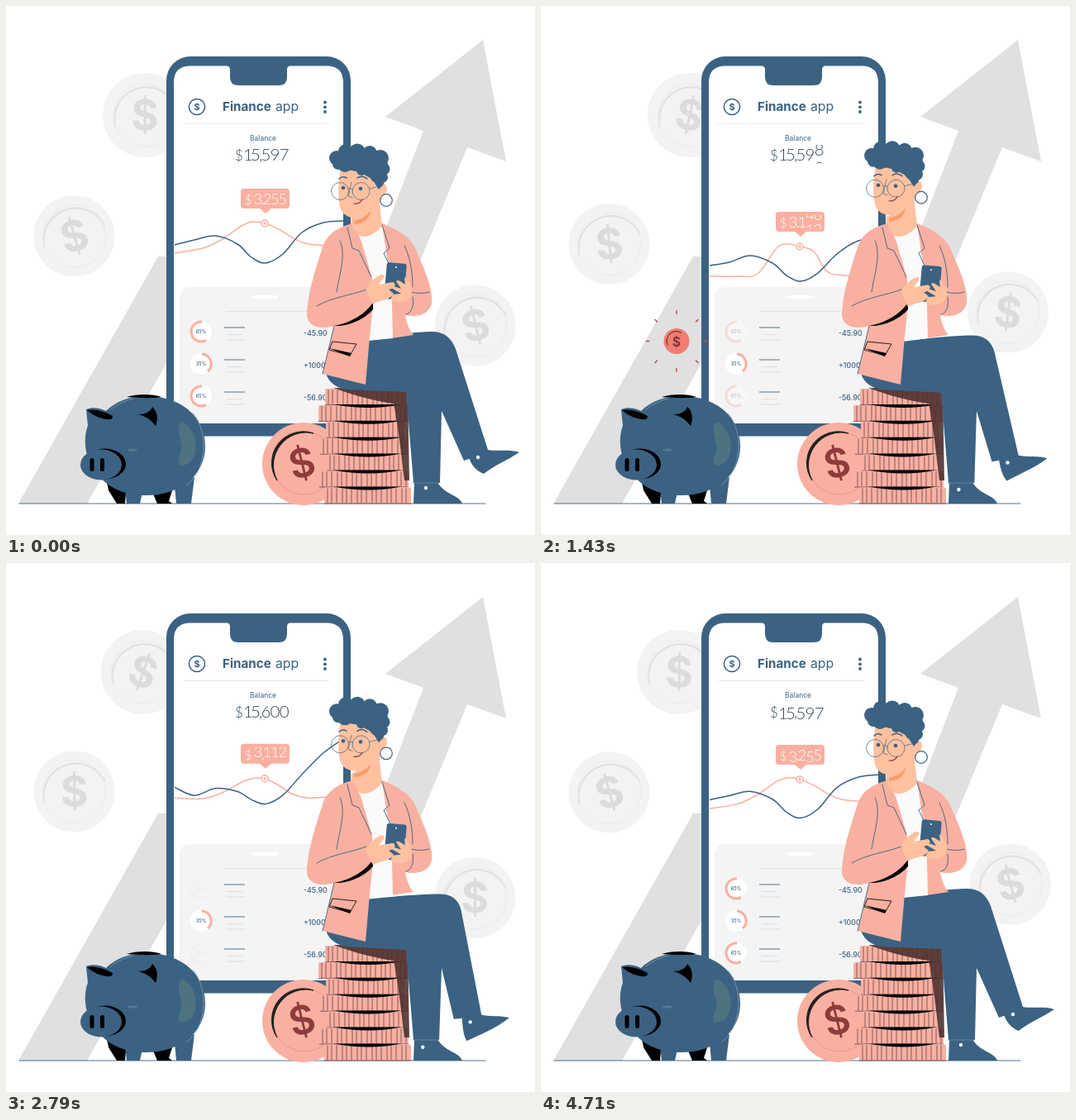
Write an HTML page that moves like this. It is 640 px wide and 640 px high and loops after 4.78 s.

```html
<!DOCTYPE html>
<html lang="en">
<head>
<meta charset="utf-8">
<title>Finance app</title>
<style>
html, body { margin: 0; width: 100%; height: 100%; overflow: hidden; background: #fff; }
svg { display: block; width: 100vw; height: 100vh; }
text { font-family: Inter, Roboto, sans-serif; fill: #3b6283; }
.navy { fill: #3b6283; }
.pink { fill: #f9b0a0; }
.skin { fill: #ffc19f; }
.grey { fill: #e0e0e0; }
.thin { fill: none; stroke: #3b6283; stroke-width: .9; stroke-linecap: round; stroke-linejoin: round; }
.curve { fill: none; stroke-width: 1.5; }
.mid { text-anchor: middle; }
.roll text { font-family: Lato, sans-serif; font-weight: 300; text-anchor: middle; }
#sum text { fill: #34495c; }
#tip text { fill: #fff; }
</style>
</head>
<body>
<svg viewBox="0 0 640 640">
  <defs>
    <clipPath id="screenClip"><rect x="203" y="75" width="205" height="430"/></clipPath>
    <clipPath id="sumClip"><rect x="270" y="168" width="80" height="22.5"/></clipPath>
    <clipPath id="tipClip"><rect x="284" y="4" width="58" height="17"/></clipPath>
    <clipPath id="slotClip"><rect x="120" y="360" width="90" height="114"/></clipPath>
  </defs>

  <g class="grey">
    <path d="M577 41L605 188L558 171L490 335H434L505 151L459 134Z"/>
    <path d="M15 602L184 303H200V422L98 602Z"/>
  </g>
  <g id="coins"></g>
  <path class="thin" d="M16 602H580"/>

  <!-- phone -->
  <rect class="navy" x="194" y="61" width="223" height="459.500" rx="29"/>
  <path fill="#fff" d="M223 72.500H267Q271 72.500 271 77V86Q271 96 281 96H330Q340 96 340 86V77Q340 72.500 344 72.500H388Q408 72.500 408 93V505H203V93Q203 72.500 223 72.500Z"/>
  <circle class="thin" cx="231" cy="122" r="9.6" style="stroke-width:1.5"/>
  <text class="mid" x="231" y="126" font-size="11" font-weight="700">$</text>
  <text x="262" y="127" font-size="15.2" font-weight="700">Finance</text>
  <text x="326" y="127" font-size="15.8">app</text>
  <g class="navy"><circle cx="386" cy="116.500" r="1.900"/><circle cx="386" cy="122.300" r="1.900"/><circle cx="386" cy="128" r="1.900"/></g>
  <path d="M215 142.500H391" stroke="#e6e6e6"/>
  <text class="mid" x="311" y="163" font-size="8.500">Balance</text>
  <g class="roll" id="sum" clip-path="url(#sumClip)" font-size="20.500"></g>

  <path fill="#f4f4f4" d="M210 505V354Q210 340 224 340H390Q404 340 404 354V505Z"/>
  <path d="M300 352H327" stroke="#fff" stroke-width="4" stroke-linecap="round"/>
  <path d="M266 369.500H371" stroke="#e2e2e2"/>
  <g id="rows"></g>

  <g clip-path="url(#screenClip)">
    <path id="pinkLine" class="curve" stroke="#f9b0a0"/>
    <path id="blueLine" class="curve" stroke="#3b6283"/>
  </g>
  <g id="tip">
    <path class="pink" d="M288 0H339Q343 0 343 4V20Q343 24 339 24H321L314 30L307 24H288Q284 24 284 20V4Q284 0 288 0Z"/>
    <g class="roll" id="tipNum" clip-path="url(#tipClip)" font-size="18"></g>
    <circle cx="313" cy="42" r="4" fill="#fff" stroke="#f9b0a0" stroke-width="1.500"/>
    <circle class="pink" cx="313" cy="42" r="1.800"/>
  </g>

  <!-- piggy bank -->
  <path d="M123 580L143 602H134L124 586ZM180 585L201 602H183L178 590ZM180 580H203L196 602H183ZM122 578H146L144 602H134Z"/>
  <path class="navy" d="M143 575H168L162 602H146ZM203 570H228L224 602H206Z"/>
  <path class="navy" d="M97 488C104 485 114 486 121 490C133 478 150 472 170 472C212 472 241 497 241 533C241 568 210 592 170 592C142 592 124 582 114 570C94 552 93 522 99 508Z"/>
  <path d="M98 489C108 487 120 491 129 496C129 500 126 501 122 500C112 499 104 494 98 489ZM177 485C184 491 184 501 181 508C175 500 168 496 160 494C168 494 175 491 177 485Z"/>
  <path d="M213 503C224 508 232 522 229 540C226 553 216 558 210 555C205 550 214 542 212 530C209 520 206 508 213 503Z" fill="#4e7280"/>
  <path class="thin" d="M226 492C246 516 243 562 218 580M127 488C136 481 145 477 154 475" style="stroke:#8ba5b5;stroke-width:.7"/>
  <ellipse cx="153" cy="537" rx="6" ry="1.800" fill="#56788a"/>
  <path d="M146 473C158 469 178 469 188 473C176 475 160 474 146 473Z"/>
  <ellipse cx="120" cy="554" rx="25" ry="18.500"/>
  <ellipse class="navy" cx="115" cy="555" rx="25" ry="18.500"/>
  <rect x="101.500" y="547" width="5" height="16" rx="2.500"/><rect x="114" y="547" width="5" height="16" rx="2.500"/>

  <!-- coin falling into the slot -->
  <path id="rays" fill="none" stroke-width="1.500" stroke-linecap="round"/>
  <g clip-path="url(#slotClip)">
    <g id="drop">
      <circle id="dropFace" r="15.500"/>
      <path d="M-10.500 5A11.500 11.500 0 0 1 6 -10" fill="none" stroke="#6b3434" stroke-width="1.200"/>
      <text class="mid" y="6" font-size="16" font-weight="600" style="fill:#7c3434">$</text>
    </g>
  </g>

  <!-- coin and stack -->
  <circle class="pink" cx="360" cy="554" r="50"/>
  <circle cx="361" cy="553" r="38" fill="#f9b0a0" stroke="#e59a8c"/>
  <path d="M328 574A38 38 0 0 1 372 517A39.500 39.500 0 0 0 328 574Z" stroke="#222" stroke-width="1.300" fill="#222"/>
  <text class="mid" font-size="48" font-weight="600" transform="translate(358 553) rotate(-14)" y="17" style="fill:#8f3b3b">$</text>
  <g id="stack"></g>
  <path d="M396 462H486L488 574H482C478 540 474 505 469 481C446 478 420 471 396 462Z" fill="#4a2e2c" opacity=".88"/>

  <!-- legs -->
  <path class="navy" d="M494 576L493 602H552C549 592 530 591 522 576Z"/>
  <path id="shoe" class="navy"/>
  <path id="legs" class="navy"/>
  <path d="M492 577H524" stroke="#6f8ca3" stroke-width=".8"/>
  <circle id="dotA" r="2.200" fill="#fff"/><circle id="dotB" r="2.200" fill="#fff"/>

  <!-- torso -->
  <path class="pink" d="M453 262C475 271 492 280 498 300C508 322 517 345 515 360C512 374 495 377 483 374C485 386 489 394 493 398L466 402Z"/>
  <path fill="#fafafa" d="M427 280L455 266L466 320L468 402L438 405L440 320Z"/>
  <path class="skin" d="M418 255L417 268C424 282 440 284 455 266L452 240Z"/>
  <path class="pink" d="M420 263C402 267 388 276 383 292C373 322 364 352 364 374C365 388 380 392 397 387L383 445L435 458L440 400L444 362L443 330L430 285Z"/>
  <path class="pink" d="M455 263L470 292L462 300L466 322L461 305Z"/>
  <path d="M397 387C418 383 434 373 444 359V367C434 379 414 388 397 387Z"/>
  <path class="thin" d="M413 268L419 293L427 296L442 328M455 265L464 293L457 299L466 318M404 284C412 300 403 326 400 346M376 363C395 352 418 350 436 343M397 387L383 445M482 290C490 306 492 326 492 340M484 373C490 372 494 364 492 352M489 346C498 348 506 348 512 346"/>
  <path d="M395 406L424 409L416 423L391 416Z" fill="#f9b0a0" stroke="#222"/>
  <path d="M391 414L418 420L416 424Z"/>

  <g id="hands">
    <rect class="navy" x="459" y="311" width="24" height="44" rx="3" transform="rotate(5 471 333)"/>
    <circle cx="472" cy="316" r="1" fill="#fff"/>
    <path class="skin" d="M435 342C443 331 451 324 456 325C461 327 453 333 451 337L468 334C474 337 469 342 463 343L469 348C464 357 452 355 444 361Z"/>
    <path class="skin" d="M482 328C489 333 493 343 490 351C486 360 472 360 465 355L468 349L478 348L466 341C465 337 474 341 478 342L472 333C474 330 480 335 483 337Z"/>
  </g>

  <!-- head -->
  <g id="head">
    <path class="skin" d="M404 200C402 218 401 236 405 246C408 253 416 257 424 256L419 260L420 272L450 262L453 230C462 229 464 217 456 214L455 195Z"/>
    <path d="M421 260C430 258 436 254 441 248C440 257 434 263 421 264Z" fill="#f99d6a"/>
    <g id="hair" class="navy"><path d="M404 190L408 200C420 196 438 203 446 214L451 222L457 215L462 190L440 174L410 176Z"/></g>
    <path class="thin" d="M418 213L414 230L419 232M393.500 224A10.500 10.500 0 1 1 414.500 224A10.500 10.500 0 1 1 393.500 224M419 224A10.500 10.500 0 1 1 440 224A10.500 10.500 0 1 1 419 224M440 221L456 217M414.500 221Q417 219 419 222" style="stroke-width:.7"/>
    <path class="thin" d="M403 209Q407 205 412 208M425 208Q431 204 437 209" style="stroke-width:1.500"/>
    <circle class="navy" cx="408" cy="220" r="2.300"/><circle class="navy" cx="429" cy="221" r="2.300"/>
    <path d="M421 239Q428 240 431 234" fill="none" stroke="#8f3b3b" stroke-width="1.200" stroke-linecap="round"/>
    <circle class="thin" cx="460" cy="235" r="7.300" style="stroke-width:1.200"/>
  </g>
</svg>
<script>
const LOOP = 4780, STEP = 71.34;
const $ = id => document.getElementById(id);
const add = (parent, tag, attrs, text = '') => {
  const el = document.createElementNS('http://www.w3.org/2000/svg', tag);
  for (const k in attrs) el.setAttribute(k, attrs[k]);
  el.textContent = text;
  return parent.appendChild(el);
};
const wave = (t, peak = 0) => Math.cos(2 * Math.PI * (t - peak) / LOOP);
const clamp = x => Math.min(1, Math.max(0, x));
const ramp = (t, a, b) => clamp((t - a) / (b - a));
const smooth = x => x * x * (3 - 2 * x);
const mix = (a, b, k) => a + (b - a) * k;
const mixRgb = (a, b, k) => `rgb(${a.map((v, i) => Math.round(mix(v, b[i], k)))})`;
const mixPath = (a, b, k) => {
  const nums = b.match(/\d+/g);
  let i = 0;
  return a.replace(/\d+/g, n => mix(+n, +nums[i++], k).toFixed(2));
};

// Floating coins
const coins = [51, 49, 49].map(r => {
  const g = add($('coins'), 'g', {});
  add(g, 'circle', { r, fill: '#f3f3f3' });
  add(g, 'path', { d: 'M-36 14A39 39 0 0 1 37 -12', fill: 'none', stroke: '#e2e2e2', 'stroke-width': 2.5 });
  add(g, 'circle', { r: 38, fill: 'none', stroke: '#ebebeb' });
  const sign = add(g, 'text', { class: 'mid', y: 18, 'font-size': 51, 'font-weight': 700, style: 'fill:#dcdcdc' }, '$');
  return { g, sign };
});
const place = ({ g, sign }, x, y, turn) => {
  g.setAttribute('transform', `translate(${x} ${y})`);
  sign.setAttribute('transform', `rotate(${turn})`);
};

// List rows
const fading = [];
[['65%', '-45.90'], ['35%', '+1000'], ['65%', '-56.90']].forEach(([share, amount], i) => {
  const y = 394 + i * 39, ring = add($('rows'), 'g', { transform: `translate(236 ${y})` });
  add(ring, 'circle', { r: 13, fill: '#fff' });
  add(ring, 'path', {
    d: i === 1 ? 'M1 -12A12 12 0 0 1 8 9' : 'M1 -12A12 12 0 1 0 6 10.4',
    fill: 'none', stroke: '#f9b0a0', 'stroke-width': 3
  });
  add(ring, 'text', { class: 'mid', y: 2, 'font-size': 5.6, 'font-weight': 500 }, share);
  if (i !== 1) fading.push(ring);
  add($('rows'), 'path', { d: `M264 ${y - 5}H289`, stroke: '#3b6283', 'stroke-width': .9 });
  add($('rows'), 'path', { d: `M267 ${y + 3.5}H286M266 ${y + 10}H290`, stroke: '#dcdcdc', 'stroke-width': .9 });
  add($('rows'), 'text', { x: 360, y: y + 5, 'font-size': 8.8, 'font-weight': 500 }, amount);
});

// Coin stack
[[386, 484], [378, 487], [387, 482], [380, 486], [388, 481], [379, 487], [385, 490]].forEach(([l, r], i) => {
  const y = 463 + i * 19.9;
  add($('stack'), 'rect', { class: 'pink', x: l, y, width: r - l, height: 19.5, rx: 2 });
  let d = `M${l} ${y + 19.5}H${r}`;
  for (let x = l + 4, j = 0; x < r - 2; x += 5 + j++ % 3) d += `M${x} ${y + 1}v18`;
  add($('stack'), 'path', { d, stroke: '#75505c', 'stroke-width': .9 });
  if (i) add($('stack'), 'path', { d: `M396 ${y - 1}H478Q440 ${y + 7} 396 ${y - 1}Z` });
});

// Curls: x, y, radius
[[400, 184, 9], [411, 176, 9], [425, 176, 9.5], [440, 178, 9], [453, 184, 10], [457, 197, 7.5],
 [455, 207, 7], [442, 194, 13], [424, 188, 12], [410, 192, 9], [402, 191, 7], [430, 199, 6], [447, 207, 6]]
  .forEach(([cx, cy, r]) => add($('hair'), 'circle', { cx, cy, r }));

// Rolling numbers: each entry is [start, end, value]
const counter = (group, y, xs, marks, height, keys) => {
  marks.forEach(([x, s, size]) => add(group, 'text', { x, y, 'font-size': size }, s));
  const slots = xs.map(x => [0, 1].map(() => add(group, 'text', { x })));
  return t => {
    let i = keys.length - 1;
    while (i && keys[i][0] > t) i--;
    const [start, end, to] = keys[i], from = (keys[i - 1] || keys[0])[2];
    const p = smooth(ramp(t, start, end));
    slots.forEach(([a, b], j) => {
      const moving = from[j] !== to[j] && p < 1;
      a.textContent = moving ? from[j] : '';
      b.textContent = to[j];
      a.setAttribute('y', y - p * height);
      b.setAttribute('y', moving ? y + (1 - p) * height : y);
    });
  };
};
const showSum = counter($('sum'), 187, [293, 302, 314.5, 325.5, 336.8], [[282, '$', 17], [308.3, ',', 20]], 22, [
  [-2, -1, '15597'], [350, 660, '15598'], [1310, 1640, '15599'], [2260, 2600, '15600'],
  [3650, 4100, '71143'], [4430, 4780, '15597']
]);
const showTip = counter($('tipNum'), 19, [305, 316, 325.5, 334.7], [[293, '$', 15], [310.8, '.', 18]], 18, [
  [-2, -1, '3255'], [400, 750, '3064'], [900, 1200, '3146'], [1230, 1620, '3112'], [2650, 3200, '5735'],
  [4020, 4370, '4225'], [4480, 4780, '3255']
]);

// Chart: heights at a few moments, smoothed over time and along the line
const TIMES = [0, 570, 1430, 2210, 3430, 4210];
const PINK_X = [204, 238, 262, 285, 299, 313, 330, 346, 366, 408];
const PINK = [
  [299, 293, 282, 266, 261, 263, 270, 280, 288, 291],
  [313, 311, 303, 283, 275, 277, 287, 299, 307, 311],
  [327, 327, 324, 293, 288, 291, 297, 321, 326, 329],
  [305, 306, 300, 282, 275, 277, 286, 299, 304, 306],
  [267, 267, 258, 249, 247, 246, 253, 262, 267, 260],
  [285, 283, 272, 257, 254, 257, 265, 274, 280, 279]
];
const BLUE_X = [204, 228, 253, 280, 297, 314, 335, 358, 384, 408];
const BLUE = [
  [289, 283, 278, 288, 304, 311, 300, 274, 262, 260],
  [307, 301, 294, 304, 320, 327, 316, 293, 279, 276],
  [314, 310, 302, 311, 326, 333, 323, 300, 284, 282],
  [291, 294, 286, 292, 305, 311, 301, 276, 257, 246],
  [255, 270, 261, 263, 270, 275, 264, 239, 207, 186],
  [270, 275, 267, 270, 281, 290, 281, 255, 234, 221]
];
const heights = (rows, t) => {
  const n = TIMES.length, row = j => rows[(j + n) % n];
  const at = j => TIMES[(j + n) % n] + LOOP * Math.floor(j / n);
  let i = n - 1;
  while (TIMES[i] > t) i--;
  const span = at(i + 1) - at(i), u = (t - at(i)) / span, s = smooth(u);
  return rows[0].map((_, c) => {
    const slope = j => (row(j + 1)[c] - row(j - 1)[c]) / (at(j + 1) - at(j - 1)) * span;
    return mix(row(i)[c], row(i + 1)[c], s) + u * (1 - u) * ((1 - u) * slope(i) - u * slope(i + 1));
  });
};
const spline = (xs, ys) => {
  const last = xs.length - 1;
  const tan = (v, i) => (v[Math.min(last, i + 1)] - v[Math.max(0, i - 1)]) / 6;
  let d = `M${xs[0]} ${ys[0]}`;
  for (let i = 0; i < last; i++) {
    const j = i + 1;
    d += `C${xs[i] + tan(xs, i)} ${ys[i] + tan(ys, i)} ${xs[j] - tan(xs, j)} ${ys[j] - tan(ys, j)} ${xs[j]} ${ys[j]}`;
  }
  return d;
};

// Leg poses, raised and lowered
const LEGS = [
  'M437 404C470 398 498 394 515 394C531 394 539 402 544 415L584 540L554 550L527 490L525 577L493 577L484 467L410 464C395 460 388 452 386 440Z',
  'M437 407C470 404 500 401 525 401C540 401 548 408 551 420L575 549L541 552L527 490L524 577L493 577L484 468L410 464C395 460 388 452 386 440Z'
];
const SHOE = [
  'M560 546C563 556 570 563 578 566C590 556 606 550 621 540C610 536 596 539 582 537Z',
  'M551 551C552 562 552 572 556 579C572 572 592 564 608 551C598 548 585 550 573 547Z'
];

function dropCoin(t) {
  const on = t > 430 && t < 2360;
  $('drop').style.display = on ? '' : 'none';
  $('rays').style.display = on && t < 1600 ? '' : 'none';
  if (!on) return;
  const fall = ramp(t, 1750, 2322), size = smooth(ramp(t, 380, 600));
  $('drop').setAttribute('transform', `translate(164 ${405.5 + 85 * fall * fall}) scale(${size})`);
  const tint = ramp(t, 560, 1000);
  $('dropFace').setAttribute('fill', mixRgb([238, 238, 238], [241, 125, 115], tint));
  const burst = ramp(t, 430, 1600), from = mix(17, 36, burst), to = mix(27, 38, burst) + 6 * Math.sin(Math.PI * burst) * (1 - burst);
  let d = '';
  for (let i = 0; i < 8; i++) {
    const c = Math.cos(i * Math.PI / 4), s = Math.sin(i * Math.PI / 4);
    d += `M${164 + c * from} ${405.5 + s * from}L${164 + c * to} ${405.5 + s * to}`;
  }
  $('rays').setAttribute('d', d);
  $('rays').setAttribute('stroke', mixRgb([255, 255, 255], [184, 80, 78], tint));
}

function draw(t) {
  const k = (1 - wave(t)) / 2;
  place(coins[0], 169.5 + 10.5 * wave(t, 1300), 132, 10 - 10 * wave(t, 100));
  place(coins[1], 82.5, 279.5 + 8.5 * wave(t, 1300), -8 - 8 * wave(t));
  place(coins[2], 567 - 2 * wave(t, 1500), 390.5 - 22.5 * wave(t, 1060), -4 + 13 * wave(t, 1850));

  fading.forEach(g => g.setAttribute('opacity', 1 - k));
  const pink = heights(PINK, t);
  $('pinkLine').setAttribute('d', spline(PINK_X, pink));
  $('blueLine').setAttribute('d', spline(BLUE_X, heights(BLUE, t)));
  $('tip').setAttribute('transform', `translate(0 ${pink[5] - 42})`);
  showSum(t);
  showTip(t);
  dropCoin(t);

  $('head').setAttribute('transform', `translate(0 ${-5 * k})`);
  $('hands').setAttribute('transform', `translate(0 ${5 * k})`);
  $('legs').setAttribute('d', mixPath(...LEGS, k));
  $('shoe').setAttribute('d', mixPath(...SHOE, k));
  $('dotA').setAttribute('transform', `translate(${571 - 10 * k} ${546 + 10 * k})`);
  $('dotB').setAttribute('transform', `translate(${508 - 4 * k} ${583 + 3 * k})`);
}

const began = performance.now();
function tick() {
  const t = (performance.now() - began) % LOOP;
  draw(Math.floor((t + 3) / STEP) * STEP % LOOP);
  requestAnimationFrame(tick);
}
tick();
</script>
</body>
</html>
```
